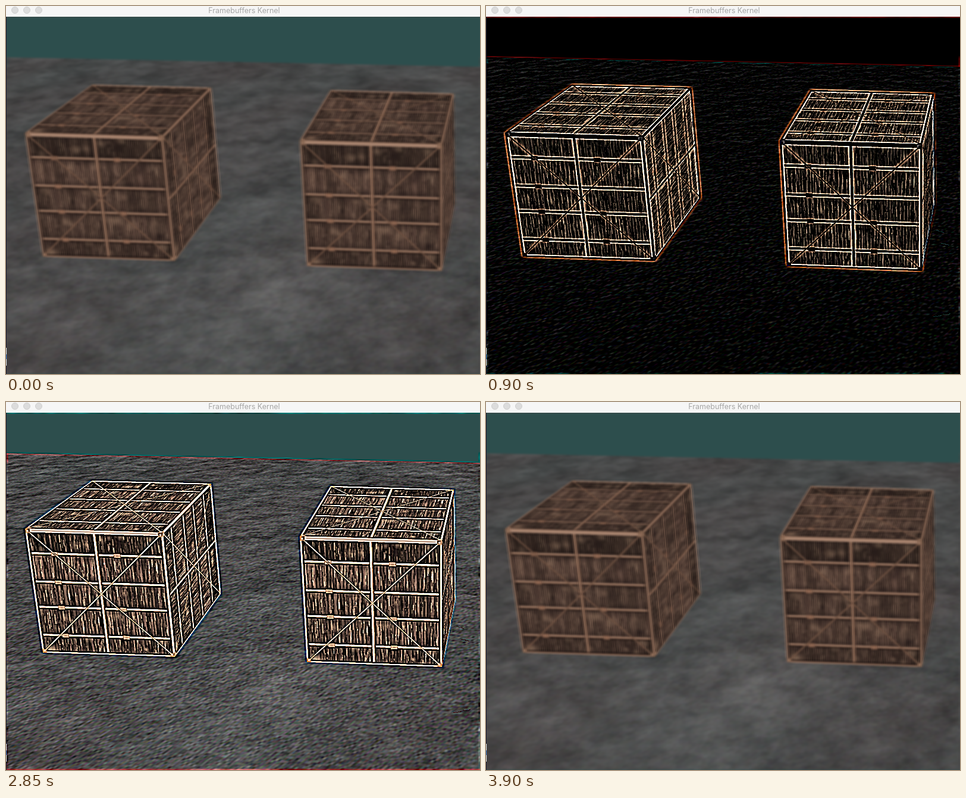
An HTML page with a canvas that plays this animation: 797x618 px, repeating every 4.22 s.

```html
<!DOCTYPE html>
<html lang="en">
<head>
<meta charset="utf-8">
<title>Framebuffers Kernel</title>
<style>
  html, body { margin: 0; width: 100%; height: 100%; overflow: hidden; background: #f6f6f6; }
  canvas { position: absolute; left: 0; top: 0; display: block; }
  h1 {
    position: absolute; left: 4px; top: 0; width: 793px; height: 15px; margin: 0;
    font: 400 12.5px/15px Inter, "Open Sans", sans-serif;
    text-align: center; color: #a6a6a6; white-space: nowrap;
  }
</style>
</head>
<body>
<canvas id="stage" width="797" height="618"></canvas>
<h1>Framebuffers Kernel</h1>
<script>
const LEFT = 1, TOP = 18, W = 796, H = 600;
const SKY = [45, 78, 77];
const ctx = document.getElementById('stage').getContext('2d');

let seed = 7;
function rnd(a = 0, b = 1) {
  seed = (Math.imul(seed, 1664525) + 1013904223) >>> 0;
  return a + (b - a) * seed / 4294967296;
}

function hash(x, y) {
  let h = Math.imul(x, 374761393) + Math.imul(y, 668265263);
  h = Math.imul(h ^ (h >>> 13), 1274126177);
  h = Math.imul(h ^ (h >>> 16), 2246822519);
  return ((h ^ (h >>> 15)) >>> 0) / 4294967296;
}

// Smooth value noise, -0.5 to 0.5
function noise(x, y) {
  const i = Math.floor(x), j = Math.floor(y);
  let s = x - i, t = y - j;
  s *= s * (3 - 2 * s);
  t *= t * (3 - 2 * t);
  const a = hash(i, j), b = hash(i + 1, j), c = hash(i, j + 1), d = hash(i + 1, j + 1);
  return a + (b - a) * s + (c - a + (a - b - c + d) * s) * t - 0.5;
}

// Maps stage points back into the unit square of a quad
function unproject([[x0, y0], [x1, y1], [x2, y2], [x3, y3]]) {
  const p = x1 - x2, q = x3 - x2, r = y1 - y2, s = y3 - y2;
  const sx = x0 - x1 + x2 - x3, sy = y0 - y1 + y2 - y3, det = p * s - q * r;
  const g = (sx * s - q * sy) / det, h = (p * sy - sx * r) / det;
  const a = x1 - x0 + g * x1, b = x3 - x0 + h * x3, c = x0;
  const d = y1 - y0 + g * y1, e = y3 - y0 + h * y3, f = y0;
  return (x, y) => {
    const w = (d * h - e * g) * x + (b * g - a * h) * y + a * e - b * d;
    return [
      ((e - f * h) * x + (c * h - b) * y + b * f - c * e) / w,
      ((f * g - d) * x + (a - c * g) * y + c * d - a * f) / w
    ];
  };
}

function crateTexture(N) {
  const cv = document.createElement('canvas');
  cv.width = cv.height = N;
  const g = cv.getContext('2d', { willReadFrequently: true });
  const box = (color, x, y, w, h) => { g.fillStyle = color; g.fillRect(x, y, w, h); };
  const beams = [0.19, 0.415, 0.62, 0.85].map(v => v * N);
  const edges = [0, ...beams, N];
  const tone = [0.68, 1.1, 0.93, 1.03, 0.82];

  for (let r = 0; r < 5; r++) {
    const y = edges[r], h = edges[r + 1] - y;
    for (let x = 0; x < N;) {
      const w = rnd(8, 16), k = tone[r] * rnd(0.8, 1.18);
      box(`rgb(${80 * k},${61 * k},${52 * k})`, x, y, w + 1, h);
      for (let t = 0; t < h;) {
        const len = rnd(8, 34);
        box(`rgba(24,16,15,${rnd(0.1, 0.85)})`, x + rnd(-1, 1), y + t, rnd(1.5, 3), len);
        t += len;
      }
      x += w;
    }
    for (let i = 0; i < 300; i++) {
      const len = rnd(5, h * 0.4), light = rnd() < 0.42;
      const color = light ? `rgba(172,140,116,${rnd(0.08, 0.45) * tone[r]})` : `rgba(28,18,17,${rnd(0.1, 0.45)})`;
      box(color, rnd(0, N), y + rnd(0, h - len), rnd(1, 4), len);
    }
    for (let i = 0; i < 12; i++) {
      const x = rnd(0, N), cy = y + rnd(0, h), rad = rnd(10, 34);
      const glow = g.createRadialGradient(x, cy, 0, x, cy, rad);
      const c = rnd() < 0.5 ? '158,126,102' : '24,16,17';
      glow.addColorStop(0, `rgba(${c},.45)`);
      glow.addColorStop(1, `rgba(${c},0)`);
      g.fillStyle = glow;
      g.fillRect(x - rad, y, rad * 2, h);
    }
    const shade = g.createLinearGradient(0, y, 0, y + h);
    shade.addColorStop(0, 'rgba(20,13,13,.4)');
    shade.addColorStop(0.25, 'rgba(20,13,13,0)');
    shade.addColorStop(0.75, 'rgba(20,13,13,0)');
    shade.addColorStop(1, 'rgba(20,13,13,.45)');
    box(shade, 0, y, N, h);
  }

  for (const y of beams) {
    box('rgba(22,14,13,.6)', 0, y + 4, N, 5);
    box('#8a6752', 0, y - 5, N, 9);
    box('#a5826d', 0, y - 4, N, 4);
  }
  beams.forEach((y, i) => {
    for (const u of i === 1 ? [0.19] : [0.19, 0.65]) {
      box('#4a352b', u * N - 13, y - 8, 26, 19);
      box('#8c6550', u * N - 12, y - 7, 24, 15);
    }
  });
  box('rgba(22,14,13,.55)', N / 2 - 8, 0, 16, N);
  box('#86614c', N / 2 - 5, 0, 10, N);
  box('#a17c65', N / 2 - 4, 0, 5, N);

  for (const [width, color] of [[8, 'rgba(28,18,16,.45)'], [4.5, '#83614d']]) {
    g.lineWidth = width;
    g.strokeStyle = color;
    g.beginPath();
    g.moveTo(0, 0); g.lineTo(N, N);
    g.moveTo(N, 0); g.lineTo(0, N);
    g.stroke();
  }
  for (const [inset, width, color] of [[8, 7, 'rgba(22,14,13,.75)'], [3, 7, '#8c6853'], [2.5, 3, '#a07c67']]) {
    g.lineWidth = width;
    g.strokeStyle = color;
    g.strokeRect(inset, inset, N - 2 * inset, N - 2 * inset);
  }
  box('#a5826d', 0, 0, N, 13);
  for (const x of [0, N - 17]) for (const y of [0, N - 17]) {
    box('#80604c', x, y, 17, 17);
    box('#a5826d', x + 5, y + 5, 6, 6);
  }
  return g.getImageData(0, 0, N, N).data;
}

function paintFloor(img) {
  const toFloor = unproject([[284, 428], [733, 445], [755, 331], [361, 322]]);
  for (let j = 0, k = 0; j < H; j++) {
    for (let i = 0; i < W; i++, k += 3) {
      const x = i + LEFT + 0.5, y = j + TOP + 0.5;
      const cover = Math.max(0, Math.min(1, y - 86 - x * 0.0201 + 0.5));
      let base = 0, tint = 0, p = 0, q = 0, fade = 1;
      if (cover) {
        const [u, v] = toFloor(x, y);
        p = u * 2 - v * 0.5;
        q = v + u * 0.6;
        fade = 1 / (1 + Math.max(0, v) * 0.22);
        base = 71 + 13 * Math.exp(-(((x - 420) / 280) ** 2) - ((y - 480) / 130) ** 2);
        base += 14 * noise(p * 1.7, q * 2) + 16 * noise(p * 4 + 9, q * 5)
          + 15 * noise(p * 9, q * 12 + 5)
          + fade * (10 * noise(p * 21, q * 26) + 9 * noise(p * 52, q * 40));
        tint = 3 * noise(p * 1.3 + 40, q * 1.3);
      }
      for (let c = 0; c < 3; c++) {
        let ground = base;
        if (cover) {
          ground += 5 * fade * noise(p * 50 + 100 * (c + 1), q * 40);
          ground += c ? tint : -tint;
        }
        img[k + c] = SKY[c] + (ground - SKY[c]) * cover;
      }
    }
  }
  // Faint reddish scratches
  for (const [sx, sy] of [[757, 376], [765, 398], [752, 521], [768, 517]]) {
    let x = sx, y = sy, dir = rnd(-0.5, 0.5);
    for (let i = 0; i < 15; i++) {
      const k = ((Math.round(y) - TOP) * W + Math.round(x) - LEFT) * 3;
      img[k] *= 0.95; img[k + 1] *= 0.88; img[k + 2] *= 0.88;
      dir += rnd(-0.6, 0.6);
      x += Math.cos(dir); y += Math.sin(dir) * 0.7;
    }
  }
}

function paintCrates(img) {
  const N = 512, tex = crateTexture(N), SS = 3;
  const sum = new Float32Array(W * H * 4);
  // Corners: front TL, TR, BR, BL, then back TL, TR, BR
  const crates = [
    [[32, 213], [263, 220], [284, 428], [62, 421], [145, 132], [345, 137], [361, 322]],
    [[494, 226], [733, 233], [733, 445], [506, 437], [546, 141], [753, 147], [755, 331]]
  ];
  for (const [a, b, c, d, e, f, g] of crates) {
    for (const quad of [[a, b, c, d], [e, f, b, a], [g, f, b, c]]) {
      const toTex = unproject(quad);
      const xs = quad.map(p => p[0]), ys = quad.map(p => p[1]);
      for (let y = Math.min(...ys) - 1; y <= Math.max(...ys); y++) {
        for (let x = Math.min(...xs) - 1; x <= Math.max(...xs); x++) {
          const o = ((y - TOP) * W + x - LEFT) * 4;
          for (let s = 0; s < SS * SS; s++) {
            const [u, v] = toTex(x + (s % SS + 0.5) / SS, y + (Math.floor(s / SS) + 0.5) / SS);
            if (u < 0 || v < 0 || u >= 1 || v >= 1) continue;
            const t = (Math.floor(v * N) * N + Math.floor(u * N)) * 4;
            for (let n = 0; n < 3; n++) sum[o + n] += tex[t + n];
            sum[o + 3]++;
          }
        }
      }
    }
  }
  for (let i = 0; i < W * H; i++) {
    const hits = sum[i * 4 + 3], total = Math.max(SS * SS, hits);
    if (!hits) continue;
    for (let c = 0; c < 3; c++) {
      img[i * 3 + c] = (sum[i * 4 + c] + img[i * 3 + c] * (total - hits)) / total;
    }
  }
}

// 3x3 kernel with weights for corners, sides and centre; taps wrap round
function filter(img, corner, side, centre) {
  const out = new ImageData(W, H), data = out.data;
  const step = W / 300, whole = Math.floor(step), part = step - whole, dy = H / 300;
  const wrapX = x => (x + W) % W * 3;
  for (let y = 0; y < H; y++) {
    const rows = [(y + H - dy) % H, y, (y + dy) % H].map(r => r * W * 3);
    for (let x = 0; x < W; x++) {
      const l0 = wrapX(x - whole), l1 = wrapX(x - whole - 1);
      const r0 = wrapX(x + whole), r1 = wrapX(x + whole + 1), m = x * 3;
      const o = (y * W + x) * 4;
      for (let c = 0; c < 3; c++) {
        let v = 0;
        for (let n = 0; n < 3; n++) {
          const k = rows[n] + c, mid = n === 1;
          const sides = (img[k + l0] + img[k + r0]) * (1 - part) + (img[k + l1] + img[k + r1]) * part;
          v += sides * (mid ? side : corner) + img[k + m] * (mid ? centre : side);
        }
        data[o + c] = v;
      }
      data[o + 3] = 255;
    }
  }
  return out;
}

function paintWindow() {
  ctx.fillStyle = '#f6f6f6';
  ctx.fillRect(0, 0, 797, TOP);
  ctx.fillStyle = '#16162a';
  ctx.fillRect(0, TOP, 1, H);
  ctx.fillStyle = '#e4e6ea';
  ctx.fillRect(0, 574, 1, 30);
  ctx.fillStyle = '#3a78c8';
  ctx.fillRect(0, 585, 1, 8);
  ctx.fillStyle = '#dcdcdc';
  ctx.strokeStyle = '#d0d0d0';
  for (const x of [15, 35, 55]) {
    ctx.beginPath();
    ctx.arc(x, 7, 5.5, 0, Math.PI * 2);
    ctx.fill();
    ctx.stroke();
  }
}

const scene = new Float32Array(W * H * 3);
paintFloor(scene);
paintCrates(scene);
const blur = filter(scene, 1 / 16, 2 / 16, 4 / 16);
const views = [
  [900, blur],
  [1800, filter(scene, 1, 1, -8)],
  [2850, filter(scene, 0, 0, 1)],
  [3900, filter(scene, -1, -1, 9)],
  [4220, blur]
];

let shown = null;
function show(t) {
  const view = views.find(v => t < v[0])[1];
  if (view !== shown) ctx.putImageData(shown = view, LEFT, TOP);
}

paintWindow();
show(0);
const start = performance.now();
function tick() {
  show(Math.max(0, performance.now() - start) % 4220);
  requestAnimationFrame(tick);
}
requestAnimationFrame(tick);
</script>
</body>
</html>
```
